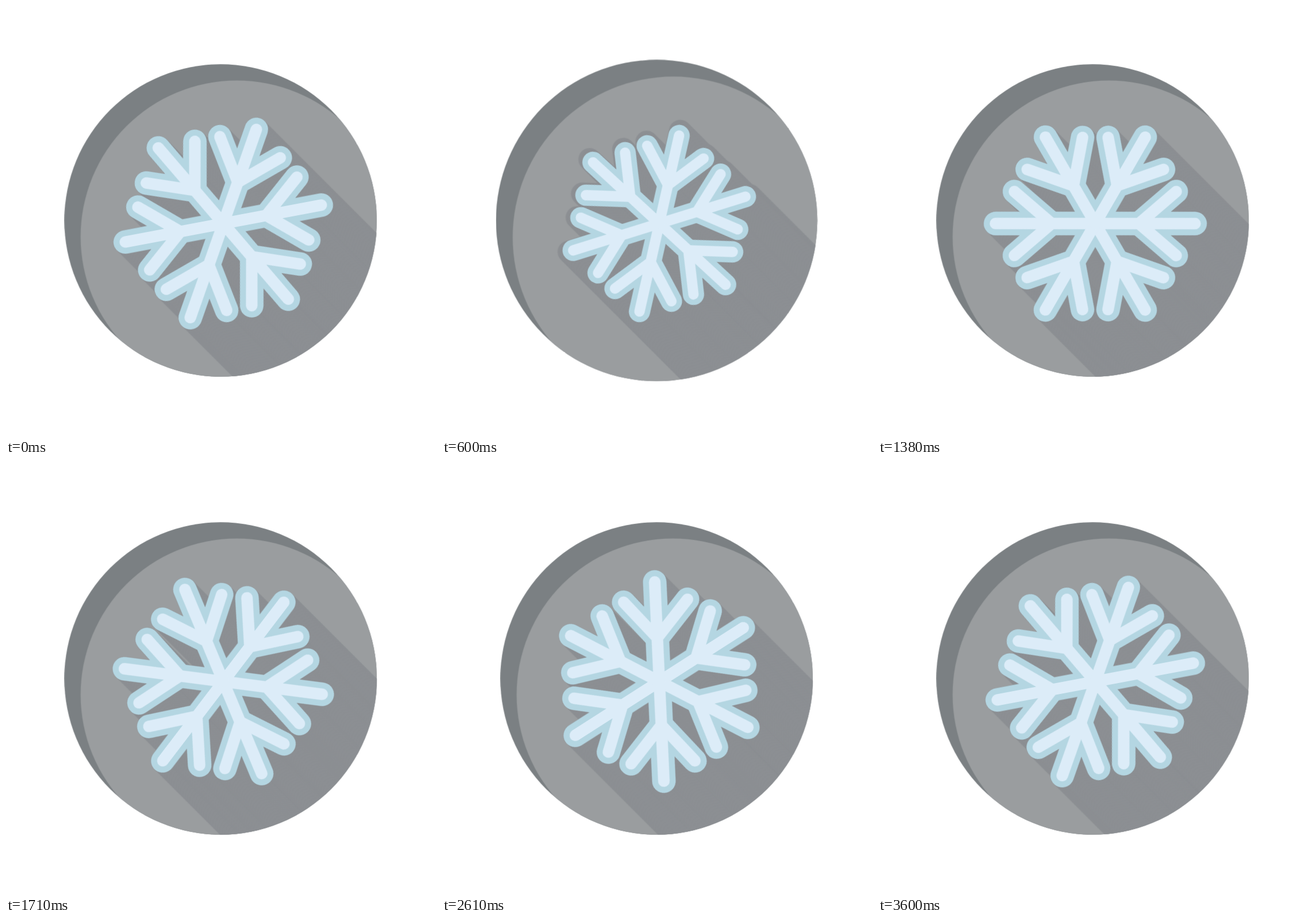
An HTML page without scripts that plays this animation: 748x748 px, repeating every 3.63 s.

```html
<!DOCTYPE html>
<html lang="en">
<head>
<meta charset="utf-8">
<title>Snowflake badge</title>
<style>
  html, body { margin: 0; width: 100%; height: 100%; overflow: hidden; background: #fff; }
  svg { display: block; width: 100%; height: 100%; }

  :root {
    /* damped spring step response, evenly sampled */
    --spring: linear(0, .062, .21, .399, .592, .766, .908, 1.012, 1.079, 1.114, 1.124,
      1.116, 1.098, 1.075, 1.051, 1.029, 1.011, .9985, .99, .986, .9846,
      .986, .988, .991, .994, .996, .999, 1, 1.001, 1.002, 1.002, 1.001, 1);
  }
  .disc, .pop, .shade { animation: 3630ms var(--spring) infinite; }
  .disc { animation-name: disc; }
  .pop { animation-name: pop; }
  .shade { animation-name: shade; }
  .turn { animation: turn 3630ms linear infinite; }

  /* the finished pose shows for 30 ms before everything springs in */
  @keyframes disc {
    0%, .82% { transform: scale(1); }
    .826%, 1.515% { transform: scale(0); }
    33.53%, 100% { transform: scale(1); }
  }
  @keyframes pop {
    0%, .82% { transform: scale(1); }
    .826%, 10.58% { transform: scale(0); }
    42.59%, 100% { transform: scale(1); }
  }
  @keyframes shade {
    0%, .82% { transform: scale(1); }
    .826%, 10.39% { transform: scale(0); }
    42.4%, 100% { transform: scale(1); }
  }
  @keyframes turn {
    0%, .82% { transform: rotate(79.333deg); }
    .826% { transform: rotate(0deg); }
    100% { transform: rotate(80deg); }
  }

  .flake { fill: none; stroke-linecap: round; stroke-linejoin: round; }
  .rim { stroke: #b4d6e2; stroke-width: 41; }
  .core { stroke: #dcecf8; stroke-width: 20; }
  .cast { stroke: #8c8f93; stroke-width: 41; }
</style>
</head>
<body>
<svg viewBox="0 0 748 748">
  <defs>
    <path id="arm" d="M0 0V-173.5M-55.6-140.7L0-76L55.6-140.7"/>
    <g id="flake">
      <use href="#arm"/>
      <use href="#arm" transform="rotate(60)"/>
      <use href="#arm" transform="rotate(120)"/>
      <use href="#arm" transform="rotate(180)"/>
      <use href="#arm" transform="rotate(240)"/>
      <use href="#arm" transform="rotate(300)"/>
    </g>
    <clipPath id="face"><circle r="271.8"/></clipPath>

    <!-- sweeps a shape towards the lower right by repeated doubling -->
    <filter id="sweep" filterUnits="userSpaceOnUse" x="-374" y="-374" width="748" height="748" color-interpolation-filters="sRGB">
      <feOffset in="SourceGraphic" dx="4" dy="4" result="o"/>
      <feMerge result="a"><feMergeNode in="SourceGraphic"/><feMergeNode in="o"/></feMerge>
      <feOffset in="a" dx="8" dy="8" result="o"/>
      <feMerge result="b"><feMergeNode in="a"/><feMergeNode in="o"/></feMerge>
      <feOffset in="b" dx="16" dy="16" result="o"/>
      <feMerge result="c"><feMergeNode in="b"/><feMergeNode in="o"/></feMerge>
      <feOffset in="c" dx="32" dy="32" result="o"/>
      <feMerge result="d"><feMergeNode in="c"/><feMergeNode in="o"/></feMerge>
      <feOffset in="d" dx="64" dy="64" result="o"/>
      <feMerge result="e"><feMergeNode in="d"/><feMergeNode in="o"/></feMerge>
      <feOffset in="e" dx="128" dy="128" result="o"/>
      <feMerge result="f"><feMergeNode in="e"/><feMergeNode in="o"/></feMerge>
      <feOffset in="f" dx="256" dy="256" result="o"/>
      <feMerge><feMergeNode in="f"/><feMergeNode in="o"/></feMerge>
    </filter>
  </defs>

  <g transform="translate(373.3 373.1)">
    <g class="disc">
      <circle r="271.8" fill="#7b8083"/>
      <g clip-path="url(#face)">
        <circle cx="28.3" cy="28.3" r="271.8" fill="#9a9d9f"/>
        <g filter="url(#sweep)">
          <g transform="translate(4.7 5.3)">
            <g class="shade"><g class="turn"><use href="#flake" class="flake cast"/></g></g>
          </g>
        </g>
      </g>
    </g>
  </g>

  <g transform="translate(378 378.4)">
    <g class="pop">
      <g class="turn">
        <use href="#flake" class="flake rim"/>
        <use href="#flake" class="flake core"/>
      </g>
    </g>
  </g>
</svg>
</body>
</html>
```
